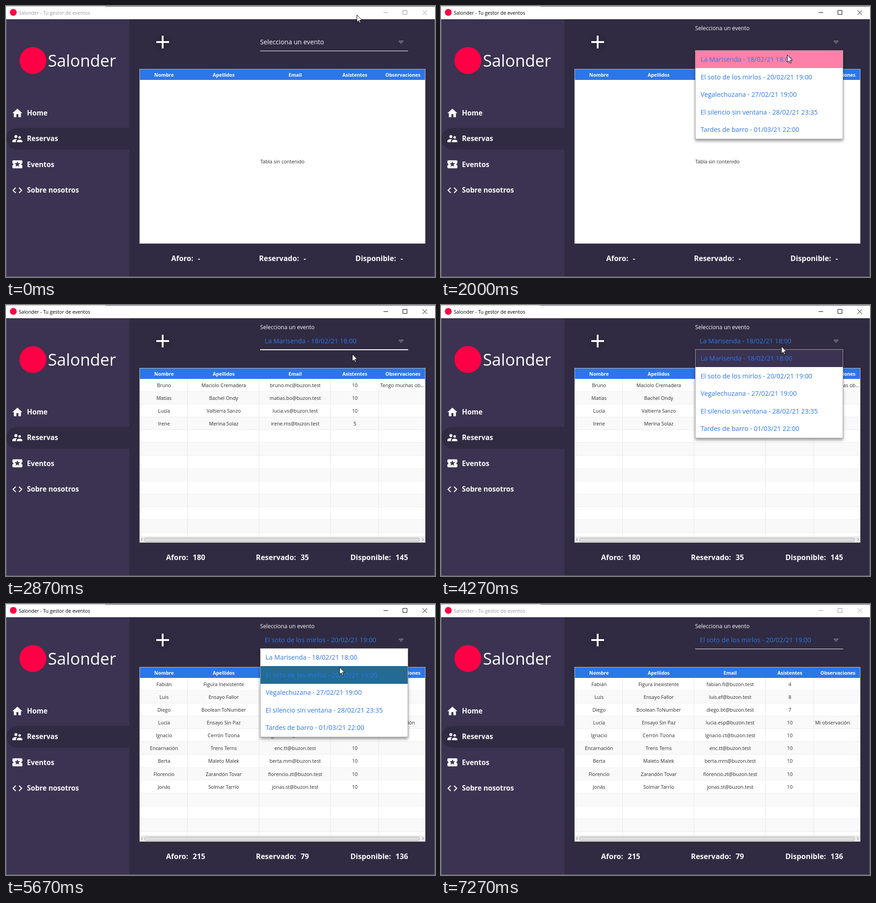
Animation of 942 by 594 pixels, one loop 7.39 s. Source, as an HTML page:

```html
<!DOCTYPE html>
<html lang="es">
<head>
<meta charset="utf-8">
<title>Salonder</title>
<style>
  html, body { margin: 0; width: 100%; height: 100%; overflow: hidden; background: #302b42; }
  svg { display: block; font-family: "Open Sans", "Noto Sans", sans-serif; }
  .menu { font-weight: 700; font-size: 15.3px; fill: #fff; }
  .stat { font-weight: 700; font-size: 16px; fill: #fff; text-anchor: middle; }
  .head { font-weight: 700; font-size: 10.5px; fill: #fff; text-anchor: middle; }
  .cell { font-size: 10.8px; fill: #2b2b2b; }
  .mid { text-anchor: middle; }
  .item { font-size: 14.3px; fill: #2d76e8; }
  #popup { filter: drop-shadow(0 4px 3px rgba(0, 0, 0, .4)); }
</style>
</head>
<body>
<svg id="stage" width="942" height="594" viewBox="0 0 942 594"></svg>
<script>
const LOOP = 7390, TICK = 1000 / 15;
const BLUE = '#2d76e8', SIDE = '#3b3351', MAIN = '#302b42', LOGO = '#ff0046';
const PINK = '#ff80a8', PICKED = [0, 150, 201], SETTLED = [35, 107, 147];

const EVENTS = [
  'La Marisenda - 18/02/21 18:00',
  'El soto de los mirlos - 20/02/21 19:00',
  'Vegalechuzana - 27/02/21 19:00',
  'El silencio sin ventana - 28/02/21 23:35',
  'Tardes de barro - 01/03/21 22:00'
];

// name, surnames, attendees, remarks
const BOOKINGS = [
  [
    ['Bruno', 'Maciolo Cremadera', 10, 'Tengo muchas ob...'],
    ['Matías', 'Bachel Ondy', 10],
    ['Lucía', 'Valtierra Sanzo', 10],
    ['Irene', 'Merina Solaz', 5]
  ],
  [
    ['Fabián', 'Figura Inexistente', 4],
    ['Luis', 'Ensayo Fallor', 8],
    ['Diego', 'Boolean ToNumber', 7],
    ['Lucía', 'Ensayo Sin Paz', 10, 'Mi observación'],
    ['Ignacio', 'Cerrón Tizona', 10],
    ['Encarnación', 'Trens Terns', 10],
    ['Berta', 'Maleto Malek', 10],
    ['Florencio', 'Zarandón Tovar', 10],
    ['Jonás', 'Solmar Tarrío', 10]
  ]
];
const STATS = [['-', '-', '-'], [180, 35, 145], [215, 79, 136]];
const STAT_LABELS = [['Aforo:', 394.5], ['Reservado:', 607], ['Disponible:', 819.5]];
const HEADERS = [['Nombre', 347], ['Apellidos', 478], ['Email', 635], ['Asistentes', 766], ['Observaciones', 871.5]];

const MENU = [
  ['Home', 234, 221.7, 'M10 20v-6h4v6h5v-8h3L12 3 2 12h3v8z'],
  ['Reservas', 290.5, 277.5, 'M16.5 12a2.5 2.5 0 1 0 0-5a2.5 2.5 0 0 0 0 5zM9 11a3 3 0 1 0 0-6a3 3 0 0 0 0 6zM16.5 14c-1.8 0-5.5.9-5.5 2.75V19h11v-2.25c0-1.85-3.7-2.75-5.5-2.75zM9 13c-2.3 0-7 1.2-7 3.5V19h7v-2.25c0-.85.3-2.3 2.4-3.5C10.5 13.1 9.7 13 9 13z'],
  ['Eventos', 347, 333.8, 'M20 12a2 2 0 0 1 2-2V6a2 2 0 0 0-2-2H4a2 2 0 0 0-2 2v4a2 2 0 0 1 0 4v4a2 2 0 0 0 2 2h16a2 2 0 0 0 2-2v-4a2 2 0 0 1-2-2zm-4.4 4.8L12 14.5l-3.6 2.3 1.1-4.1-3.3-2.7 4.3-.3L12 5.8l1.5 3.9 4.3.3-3.3 2.7z'],
  ['Sobre nosotros', 403.5, 390.8, 'M9.4 16.6L4.8 12l4.6-4.6L8 6l-6 6 6 6zm5.2 0l4.6-4.6-4.6-4.6L16 6l6 6-6 6z']
];

// time, x, y
const POINTER = [
  [67, 770, 19], [533, 761, 78], [600, 761, 78], [933, 760, 88], [1600, 760, 88], [2000, 760, 107],
  [3067, 760, 107], [3200, 750, 97], [3333, 750, 97], [3600, 747, 90], [4400, 747, 90],
  [4867, 732, 138], [6067, 732, 138], [6667, 132, 586], [6733, 132, 640]
];

const rect = (x, y, w, h, fill, extra = '') =>
  `<rect x="${x}" y="${y}" width="${w}" height="${h}" fill="${fill}" ${extra}/>`;
const text = (x, y, cls, str, extra = '') => `<text x="${x}" y="${y}" class="${cls}" ${extra}>${str}</text>`;
const path = (d, extra) => `<path d="${d}" ${extra}/>`;
const rowTop = i => Math.round(97.5 + i * 38.5);

function email(name, surnames) {
  const first = name.length > 9 ? name.slice(0, 3) : name;
  const initials = surnames.split(' ').map(w => w[0]).join('');
  return `${first}.${initials}`.normalize('NFD').replace(/[\u0300-\u036f]/g, '').toLowerCase() + '@buzon.test';
}

function windowBar() {
  return rect(0, 0, 942, 29, '#fff') + rect(218, 0, 724, 1, '#33323a') + rect(0, 0, 218, 1, '#aaa') +
    `<circle cx="16" cy="14" r="7.5" fill="${LOGO}"/>` +
    `<g id="bar">${text(28, 18.7, '', 'Salonder - Tu gestor de eventos', 'font-size="10.7"')}
      ${path('M829 14.5h10M871.5 9.5h9v9h-9zM914.5 9.5l10 10M924.5 9.5l-10 10', 'fill="none" stroke="currentColor"')}</g>`;
}

function sidebar() {
  return rect(0, 29, 271, 565, SIDE) +
    path('M271 267H25a24 24 0 0 0 0 48H271z', `fill="${MAIN}"`) +
    `<circle cx="59" cy="119.5" r="29.5" fill="${LOGO}"/>` +
    text(92, 132.5, '', 'Salonder', 'font-size="36" fill="#fff"') +
    MENU.map(([label, y, top, d]) =>
      path(d, `fill="#fff" transform="translate(11.8 ${top}) scale(1.1)"`) + text(46, y + 5.5, 'menu', label)).join('');
}

function combo() {
  return `<radialGradient id="glow"><stop offset=".4" stop-opacity=".1"/><stop offset="1" stop-opacity="0"/></radialGradient>
    <circle cx="344" cy="81" r="23" fill="url(#glow)"/>` +
    path('M330 79h28M344 65v28', 'stroke="#fff" stroke-width="4"') +
    text(0, 0, '', 'Selecciona un evento', 'id="label" font-size="14.3" fill="#fff"') +
    text(568, 83.5, 'item', '', 'id="value"') +
    path('M862.5 76.5h10l-5 6z', 'fill="#55515f" stroke="#8d8a96"') +
    rect(558, 98, 325, 1, '#fff') + rect(558, 97, 325, 2, '#fff', 'id="focus"');
}

function grid(rows) {
  const top = 161.5, pitch = 28.15;
  let out = '<g clip-path="url(#sheet)">';
  for (let i = 0; i < 13; i++) {
    const y = top + i * pitch;
    out += rect(294, y, 626, pitch, i % 2 ? '#f9f9f9' : '#fff') + rect(294, Math.round(y + pitch) - 1, 626, 1, '#ececec');
  }
  for (const x of [398, 555, 712, 818]) out += rect(x, 162, 1, 345, '#e8e8e8');
  rows.forEach(([name, surnames, seats, note = ''], i) => {
    const y = top + i * pitch + 18;
    [name, surnames, email(name, surnames), seats].forEach((s, c) => out += text(HEADERS[c][1], y, 'cell mid', s));
    out += text(821.5, y, 'cell', note);
  });
  return out + '</g>' + rect(294, 507, 626, 13, '#ececec') +
    rect(304.5, 510.5, 603, 8, '#dedede', 'rx="2" stroke="#b4b4b4"') +
    path('M300 511l-3 3 3 3M914 511l3 3-3 3', 'fill="none" stroke="#777"');
}

function table() {
  return '<clipPath id="sheet"><path d="M294 139h626v368H294z"/></clipPath>' +
    rect(293, 138, 628, 383, '#fff') +
    text(607, 345, 'cell mid', 'Tabla sin contenido', 'id="empty"') +
    BOOKINGS.map((rows, i) => `<g id="grid${i + 1}">${grid(rows)}</g>`).join('') +
    rect(294, 139, 626, 23, BLUE) + HEADERS.map(([s, x]) => text(x, 155, 'head', s)).join('') +
    rect(293.5, 138.5, 627, 382, 'none', 'stroke="#c0c0c0"') +
    STAT_LABELS.map(([s, x], i) =>
      text(x, 559, 'stat', `${s}<tspan dx="10" id="stat${i}"></tspan>`)).join('');
}

function popup() {
  return '<g id="popup">' + rect(558, 97, 325, 195, '#fff') +
    EVENTS.map((s, i) => rect(559, rowTop(i), 323, rowTop(i + 1) - rowTop(i), '#fff', `id="row${i}"`) +
      text(570, 122 + i * 38.5, 'item', s)).join('') +
    rect(558.5, 97.5, 324, 194, 'none', 'stroke="#a6a6a6"') + '</g>';
}

const stage = document.getElementById('stage');
stage.innerHTML = rect(0, 0, 942, 594, MAIN) + windowBar() + sidebar() + combo() + table() +
  path('M.5 29V593.5H941.5V29', 'fill="none" stroke="#777583"') + popup() +
  path('M0 0V16L3.7 12.6 6.2 18 8.5 17 6 11.6H11Z', 'id="pointer" fill="#fff" stroke="#000"');

const el = id => document.getElementById(id);
const set = (id, name, value) => el(id).setAttribute(name, value);
const show = (id, on) => { el(id).style.display = on ? '' : 'none'; };
const progress = (t, a, b) => Math.min(1, Math.max(0, (t - a) / (b - a)));
const smooth = p => p * p * (3 - 2 * p);
const lerp = (a, b, p) => a + (b - a) * p;

function pointerAt(t) {
  let i = 0;
  while (i < POINTER.length - 2 && t > POINTER[i + 1][0]) i++;
  const [a, x0, y0] = POINTER[i], [b, x1, y1] = POINTER[i + 1];
  const p = smooth(progress(t, a, b));
  return [lerp(x0, x1, p), lerp(y0, y1, p)];
}

function rowColor(row, t, y, picked) {
  const second = t > 4000, hoverRow = second ? 1 : 0, chosenAt = second ? 5466 : 2666;
  if (picked === row + 1 && t >= chosenAt) {
    const p = progress(t, chosenAt, chosenAt + 200);
    return `rgb(${PICKED.map((c, i) => Math.round(lerp(c, SETTLED[i], p)))})`;
  }
  if (picked === row + 1) return SIDE;
  return row === hoverRow && y >= rowTop(row) ? PINK : '#fff';
}

function draw(now) {
  // The picture advances in 15 steps per second.
  const t = Math.floor((now % LOOP + 4) / TICK) * TICK + 1;
  const picked = t < 2666 ? 0 : t < 5466 ? 1 : 2;
  const active = t >= 666 && t < 7266;
  const [x, y] = pointerAt(t);

  set('bar', 'fill', active ? '#000' : '#999');
  set('bar', 'color', active ? '#000' : '#999');
  const width = active ? 325 * smooth(progress(t, 620, 934)) : 0;
  set('focus', 'x', 558 + (325 - width) / 2);
  set('focus', 'width', width);

  const rise = smooth(progress(t, 1201, 1400));
  set('label', 'transform', `translate(558 ${lerp(83.5, 52.5, rise)}) scale(${lerp(1, .853, rise)})`);
  el('value').textContent = picked ? EVENTS[picked - 1] : '';
  show('empty', !picked);
  show('grid1', picked === 1);
  show('grid2', picked === 2);
  STATS[picked].forEach((s, i) => { el('stat' + i).textContent = s; });

  show('popup', t >= 1200 && t < 2866 || t >= 4266 && t < 5733);
  EVENTS.forEach((_, i) => set('row' + i, 'fill', rowColor(i, t, y, picked)));
  set('pointer', 'transform', `translate(${Math.round(x) + .5} ${Math.round(y) + .5})`);
}

function loop() {
  draw(performance.now());
  requestAnimationFrame(loop);
}
loop();
</script>
</body>
</html>
```
